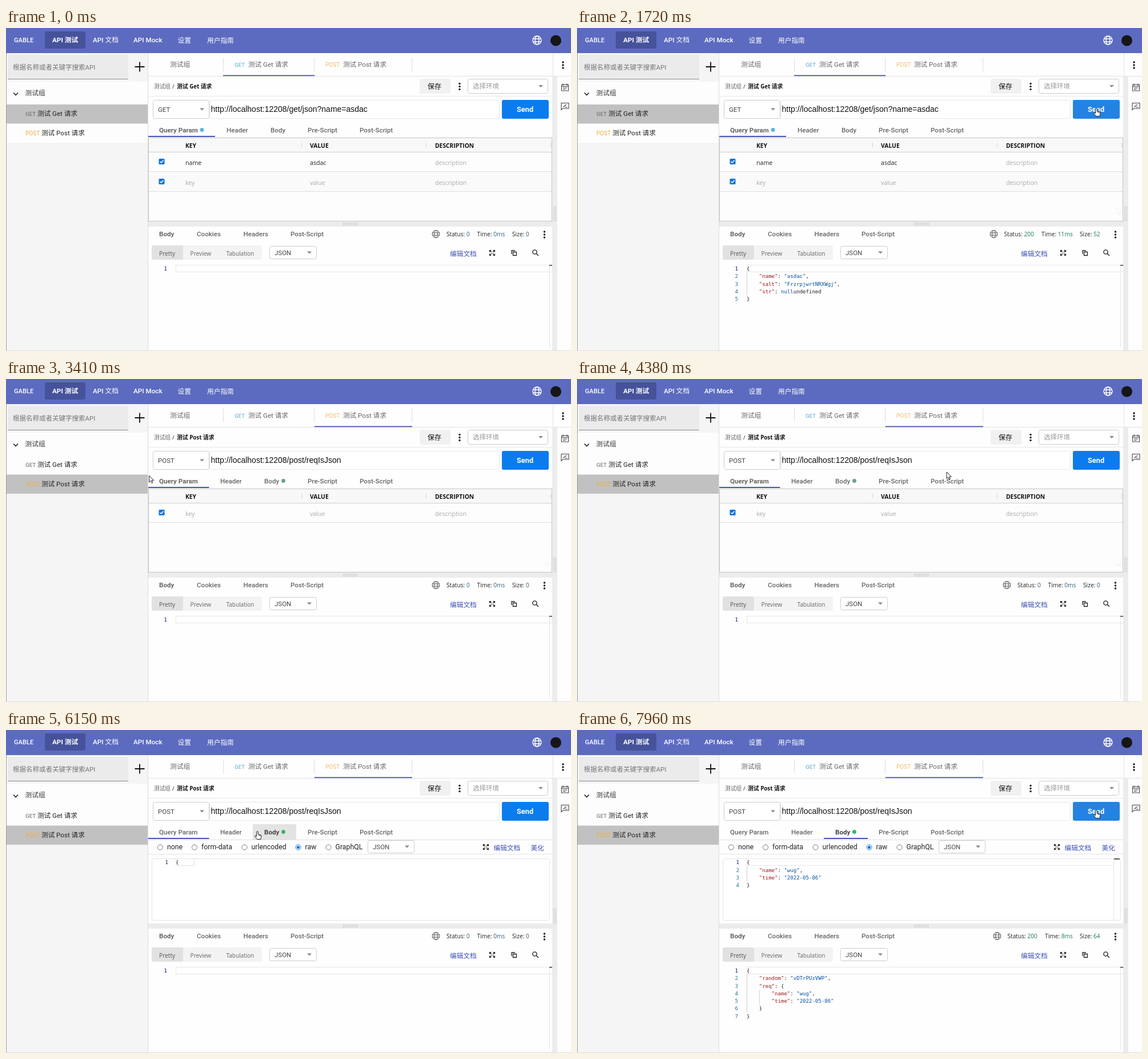
Animation of 989 by 566 pixels, one loop 8 s. Source, as an HTML page:

```html
<!DOCTYPE html>
<html lang="zh">
<head>
<meta charset="utf-8">
<title>API 测试</title>
<style>
html, body { margin: 0; width: 100%; height: 100%; overflow: hidden; background: #fff; }
svg { display: block; width: 989px; height: 566px; }
text { font: 400 11.6px Roboto, "Noto Sans CJK SC", "Noto Sans CJK", sans-serif; white-space: pre; }
text.ui { font-family: "Open Sans", "Noto Sans CJK SC", sans-serif; }
text.url { font: 14px "Liberation Sans", Arial, sans-serif; }
text.code { font: 9.05px "DejaVu Sans Mono", "Noto Sans Mono", monospace; }
</style>
</head>
<body>
<svg id="stage" viewBox="0 0 989 566"></svg>
<script>
const LOOP = 8000;
const BLUE = '#3f51b5', GREY = '#666', PALE = '#a9a9a9', INK = '#222';

// Drawing helpers
const rect = (x, y, w, h, fill, more = '') =>
  `<rect x="${x}" y="${y}" width="${w}" height="${h}" fill="${fill}" ${more}/>`;
const frame = (x, y, w, h, line = '#ccc', r = 3) =>
  rect(x + .5, y + .5, w - 1, h - 1, '#fff', `stroke="${line}" rx="${r}"`);
const circle = (x, y, r, fill, more = '') =>
  `<circle cx="${x}" cy="${y}" r="${r}" fill="${fill}" ${more}/>`;
const path = (d, x = 0, y = 0, color = INK, w = 1.2, fill = 'none') =>
  `<path d="${d}" transform="translate(${x} ${y})" fill="${fill}" stroke="${color}" stroke-width="${w}"/>`;
const text = (x, y, s, color = INK, size = 11.6, weight = 400, cls = '') =>
  `<text x="${x}" y="${y}" class="${cls}" fill="${color}" style="font-size:${size}px;font-weight:${weight}">${s}</text>`;
const ui = (x, y, s, color = INK, size = 10.6, weight = 400) => text(x, y, s, color, size, weight, 'ui');
const group = (id, body, more = '') => `<g id="${id}" ${more}>${body}</g>`;
const kebab = (x, y) => [-5, 0, 5].map(d => circle(x, y + d, 1.7, '#111')).join('');
const arrow = (x, y) => path('M-4 -2H4L0 2Z', x, y, 'none', 0, '#888');
const select = (x, y, w, h, s, color = '#444') =>
  frame(x, y, w, h) + text(x + 9, y + h / 2 + 4, s, color, 11.5) + arrow(x + w - 13, y + h / 2);
const globe = (x, y, r, color, w = 1.2) =>
  circle(x, y, r, 'none', `stroke="${color}" stroke-width="${w}"`) +
  `<ellipse cx="${x}" cy="${y}" rx="${r * .45}" ry="${r}" fill="none" stroke="${color}" stroke-width="${w}"/>` +
  path(`M${-r} ${-r * .33}H${r}M${-r} ${r * .33}H${r}`, x, y, color, w);
const expand = (x, y) =>
  path('M-4.5 -1.5V-4.5H-1.5M1.5 -4.5H4.5V-1.5M4.5 1.5V4.5H1.5M-1.5 4.5H-4.5V1.5M-4 -4L-1 -1M4 -4L1 -1M4 4L1 1M-4 4L-1 1', x, y);
const grip = (x, y, cols, rows) => {
  let s = '';
  for (let i = 0; i < cols * rows; i++)
    s += rect(x + (i % cols) * 3, y + Math.floor(i / cols) * 3, 1.4, 1.4, '#b5b5b5');
  return s;
};
const checkbox = (x, y) =>
  rect(x - 5, y - 5, 10, 10, '#0b74e0', 'rx="1.5"') + path('M-2.8 0L-.8 2.2L3 -2.2', x, y, '#fff', 1.5);

// Code lines with numbers, token colours and indent guides
const paint = s => s.replace(/"[^"]*"(:?)|null/g, (m, colon) =>
  `<tspan fill="${colon ? '#a31515' : '#0451a5'}">${colon ? m.slice(0, -1) : m}</tspan>${colon}`);
function code(y, end, lines) {
  return lines.map((s, i) => {
    const deep = s.search(/\S/), by = y + 13.25 * i;
    let out = text(end - (5.45), by, i + 1, i ? '#237893' : '#0b216f', 9.05, 400, 'code');
    for (let k = 0; k < deep; k += 4) out += rect(297 + k * 5.45, by - 10, 1, 13.3, '#d0d0d0');
    return out + text(297 + deep * 5.45, by, paint(s.trim()), INK, 9.05, 400, 'code');
  }).join('');
}
const currentLine = (y, right) =>
  rect(297.5, y + .5, right - 297, 12, '#fff', 'stroke="#e6e6e6"');

function tabs(names, xs, active, strong) {
  return names.map((s, i) =>
    text(xs[i], 182.5, s, i === active ? strong : GREY, 11.6, i === active ? 700 : 500)).join('');
}
const tabNames = ['Query Param', 'Header', 'Body', 'Pre-Script', 'Post-Script'];
const getXs = [268, 386, 463, 528, 619], postXs = [268, 375, 452, 528, 619];

const status = (id, xs, vals, color) => {
  const item = (i, label) => ui(xs[i + 1], 364.5, `${label}: <tspan fill="${color}">${vals[i]}</tspan>`, INK, 10.2);
  return group(id, globe(xs[0], 361, 6.4, '#555', 1) + item(0, 'Status') + item(1, 'Time') + item(2, 'Size'));
};
const row = (y, cells, color) => checkbox(272.5, y - 1) +
  [314, 532, 751].map((x, i) => ui(x, y + 4.5, cells[i], i < 2 ? color : PALE)).join('');
const crumb = name => ui(259, 106, '测试组', GREY, 9.7) + ui(291, 106, '/', INK, 9.7) + ui(299, 106, name, '#111', 9.8, 700);
const radio = (x, s, on) =>
  circle(x, 205.5, 4.5, '#fff', `stroke="${on ? '#0b74e0' : '#777'}"`) +
  (on ? circle(x, 205.5, 2.6, '#0b74e0') : '') + text(x + 12, 209, s, INK, 12.3);

const header =
  rect(0, 0, 989, 44, '#5c6bc0') + rect(68, 6, 71, 30, '#46529a', 'rx="3"') +
  text(14, 25, 'GABLE', '#fff', 11.1, 500) + text(81, 25, 'API 测试', '#fff', 11.7, 700) +
  text(152, 25, 'API 文档', '#fff', 11.7, 500) + text(223, 25, 'API Mock', '#fff', 11.7, 500) +
  text(300.5, 25.5, '设置', '#fff', 11.7) + text(352, 25.5, '用户指南', '#fff', 11.7) +
  globe(929.5, 21.5, 7.5, '#fff', 1.4) + circle(962.5, 22, 9.5, '#161616');

const sidebar =
  rect(0, 44, 248, 522, '#f5f5f5') + rect(3, 47, 211, 42, '#ebebeb') + rect(3, 89, 211, 1, '#8c8c8c') +
  text(12, 72.5, '根据名称或者关键字搜索API', '#757575', 11.5) +
  path('M-8.5 0H8.5M0 -8.5V8.5', 234, 68, '#111', 1.8) +
  rect(0, 94, 248, 107, '#fdfdfd') +
  path('M-4 -2L0 2L4 -2', 17, 115.5, INK, 1.6) + text(33.5, 118, '测试组', '#333', 11.7) +
  rect(0, 134, 248, 33.5, '#c1c1c1', 'id="pick"') +
  group('itemHover', rect(0, 167.5, 248, 33.5, '#e0e0e0') + kebab(231.5, 185)) +
  text(34, 154, 'GET', '#666', 9.8) + text(55, 154, '测试 Get 请求', INK, 11.6) +
  text(34, 187.5, 'POST', '#efae3d', 10) + text(62, 187.5, '测试 Post 请求', INK, 11.6) +
  rect(248, 44, 1, 522, '#dcdcdc') + rect(0, 44, 1, 522, '#9a9a9a');

const topTabs =
  text(287, 68, '测试组', GREY, 11.7) +
  text(400, 67.5, 'GET', '#5fa9cf', 9.8) + text(424, 68, '测试 Get 请求', GREY, 11.6) +
  text(559, 67.5, 'POST', '#f3bd6a', 10) + text(590, 68, '测试 Post 请求', GREY, 11.6) +
  [380, 539, 710].map(x => rect(x, 52, 1, 24, '#dedede')).join('') +
  rect(249, 84, 740, 1, '#e2e2e2') + rect(380, 82.5, 160, 1.7, '#4653a6', 'id="topLine"') +
  rect(957, 44, 1, 41, '#e2e2e2') + kebab(975, 65) +
  rect(956, 85, 9, 481, '#ececec') + grip(958.5, 313, 2, 9) +
  path('M-6 -4.5H6V6H-6ZM-6 -1.5H6M-3.5 -7V-3M3.5 -7V-3M-3.5 1H3.5M-3.5 3.5H1', 978.5, 104, '#444', 1.1) +
  path('M-6.5 6.5V-5.5H6.5V4H-4ZM-3 1.5L2.5 -3M0 1.8H4', 978.5, 137, '#444', 1.1);

const request =
  group('getCrumb', crumb('测试 Get 请求')) + group('postCrumb', crumb('测试 Post 请求')) +
  rect(724, 89, 54, 26, '#f1f1f1', 'rx="3"') + text(738, 106.5, '保存', '#111', 12, 500) + kebab(794, 102.5) +
  select(808, 89, 141, 26, '选择环境', '#999') + rect(249, 119, 707, 1, '#e8e8e8') +
  frame(356, 126, 508, 33, '#e8e8e8') +
  group('getUrl', select(257, 126, 99, 33, 'GET') + text(358.5, 146.5, 'http://localhost:12208/get/json?name=asdac', '#111', 14, 400, 'url')) +
  group('postUrl', select(257, 126, 99, 33, 'POST') + text(358.5, 146.5, 'http://localhost:12208/post/reqIsJson', '#111', 14, 400, 'url')) +
  rect(868, 126, 82, 33, '#0a7cee', 'rx="3" id="send"') + text(894, 147, 'Send', '#fff', 12.8, 700) +
  rect(432, 165, 76, 27, '#e3e3e3', 'id="tabHover"') +
  group('getTabs', tabs(tabNames, getXs, 0, GREY) + circle(343, 178.5, 3.4, '#5cb3e4')) +
  group('postTabs', tabs(tabNames, postXs, 0, GREY) + circle(485.5, 178.5, 3.4, '#6f9f88')) +
  group('bodyTabs', tabs(tabNames, postXs, 2, '#444') + circle(485.5, 178.5, 3.4, '#45ad68'));

const table = group('table',
  rect(249.5, 192.5, 706, 146, '#fdfdfd', 'stroke="#c4c4c4"') + rect(250, 193, 705, 24, '#f8f8f8') +
  rect(250, 217, 705, 1, '#cfcfcf') +
  ui(314, 209.5, 'KEY', '#111', 10.3, 700) + ui(532, 209.5, 'VALUE', '#111', 10.3, 700) + ui(751, 209.5, 'DESCRIPTION', '#111', 10.3, 700) +
  [517, 735, 953].map(x => rect(x, 201, 1, 8, '#d4d4d4')).join('') +
  group('menu', path('M-4.5 -3H4.5M-4.5 0H4.5M-4.5 3H4.5', 714.5, 204.5, '#999', 1)) +
  rect(250, 252, 705, 34, '#fafafa', 'id="secondBack"') +
  rect(250, 218, 704, 33, '#e7f4fe', 'id="rowHover"') + rect(250, 251, 705, 1, '#dedede') +
  group('getRows', row(235, ['name', 'asdac', 'description'], INK) +
    row(270, ['key', 'value', 'description'], PALE) + rect(250, 286, 705, 1, '#dedede')) +
  group('postRows', row(235, ['key', 'value', 'description'], PALE)) +
  path('M0 0V11L3 8.5L5 13L7 12L5 8H9Z', 944.5, 315, '#f1f1f1', 1, '#fff').replace('<path', '<path id="ghost"'));

const bodyPanel = group('bodyPanel',
  rect(249, 192, 707, 1, '#dedede') + radio(270, 'none') + radio(330, 'form-data') + radio(417.5, 'urlencoded') +
  radio(511.5, 'raw', true) + radio(564.5, 'GraphQL') + select(633, 193, 82, 23, 'JSON') +
  expand(840, 205) + text(853.5, 211, '编辑文档', BLUE, 11.7) + text(918.5, 211, '美化', BLUE, 11.7) +
  rect(249, 217, 707, 1, '#e4e4e4') + frame(255, 225, 697, 109, '#e4e4e4') +
  group('loading', rect(297.5, 225.5, 32, 12, '#fff', 'stroke="#e2e2e2"') + code(235.3, 284, ['{'])) +
  group('loaded', currentLine(225, 939) + rect(939, 226, 1, 107, '#e2e2e2') + rect(940, 225, 10, 2, '#555') +
    code(235.3, 284, ['{', '    "name": "wug",', '    "time": "2022-05-86"', '}'])));

const response =
  rect(249, 339, 707, 9, '#ececec') + grip(590, 341.5, 9, 2) +
  text(268, 365, 'Body', GREY, 11.6, 700) + text(334, 365, 'Cookies', GREY, 11.6, 500) +
  text(415.5, 365, 'Headers', GREY, 11.6, 500) + text(498, 365, 'Post-Script', GREY, 11.6, 500) +
  status('idle', [752.5, 771, 824.5, 886], ['0', '0ms', '0'], '#2c5f7c') +
  status('getStat', [729.5, 747.5, 813, 880], ['200', '11ms', '52'], '#1b7a50') +
  status('postStat', [735.5, 753.5, 819, 880], ['200', '8ms', '64'], '#1b7a50') + kebab(942.5, 362) +
  rect(255, 381, 193, 25, '#f3f3f3', 'rx="3"') + rect(255, 381, 55, 25, '#e1e1e1', 'rx="3"') +
  ui(268, 399, 'Pretty', '#555', 10.2) + ui(322.5, 399, 'Preview', '#666', 10.2) + ui(385.5, 399, 'Tabulation', '#666', 10) +
  select(461, 382, 83, 23, 'JSON') + text(777, 399.5, '编辑文档', BLUE, 11.7) + expand(851, 394) +
  path('M-1.5 -1.5H4.5V4.5H-1.5ZM-4 2V-4H2', 889, 394, INK, 1.3) +
  circle(925.5, 392.5, 3.6, 'none', 'stroke="#222" stroke-width="1.4"') + path('M2.5 2.5L6.5 6.5', 925.5, 392.5, INK, 1.5) +
  currentLine(415, 956) + rect(951, 416, 1, 144, '#e4e4e4') + rect(951, 415, 5, 1.6, '#444') +
  group('emptyCode', code(425.2, 282, ['{']).replace('>{<', '><')) +
  group('getCode', code(425.2, 282, ['{', '    "name": "asdac",', '    "salt": "FrzrpjwrtNRXWgj",', '    "str": null', '}'])) +
  group('postCode', code(425.2, 282, ['{', '    "random": "vDTrPUzVWP",', '    "req": {',
    '        "name": "wug",', '        "time": "2022-05-86"', '    }', '}']));

const cursors = group('cursor',
  group('point', path('M0 0V11.5L2.7 9L4.6 13L6.4 12.2L4.6 8.3H8.2Z', 0, 0, '#222', 1, '#fff')) +
  group('hand', path('M-1.3 10V1.2Q0 -.6 1.3 1.2V6L6 7Q7.2 7.5 7 9L6 14.5H-.5L-4.3 9.5Q-4.6 7.6 -2.8 8.2ZM3 6.5V8.5M5 7V8.8', 0, 0, '#222', 1, '#fff')) +
  group('beam', path('M-2.5 -5.5H-.7L0 -5L.7 -5.5H2.5M0 -5V5M-2.5 5.5H-.7L0 5L.7 5.5H2.5', 0, 0, '#333', 1)) +
  group('resize', path('M-1 -5V5M1.5 -5V5M-2 0H-6M-4 -2L-6 0L-4 2M2.5 0H7M5 -2L7 0L5 2', 0, 0, '#222', 1)));

const stage = document.getElementById('stage');
stage.innerHTML = rect(0, 0, 989, 566, '#fefefe') + header + sidebar + topTabs + request + table + bodyPanel +
  rect(249, 189, 117, 2, BLUE, 'id="tabLine"') + response + rect(0, 565, 989, 1, '#dcdcdc') + cursors;

const parts = {};
stage.querySelectorAll('[id]').forEach(e => parts[e.id] = e);
const show = flags => {
  for (const id in flags) parts[id].style.display = flags[id] ? '' : 'none';
};
const set = (id, attrs) => {
  for (const k in attrs) parts[id].setAttribute(k, attrs[k]);
};

// Pointer path: time, x, y
const trail = [
  [210, 940, 522], [330, 914, 324], [580, 914, 324], [640, 944, 315], [710, 958, 190], [800, 958, 190],
  [1090, 909, 140], [1970, 909, 140], [2730, 158, 180], [2900, 158, 180], [2910, 153, 173],
  [3180, 153, 173], [3810, 419, 163], [4060, 419, 163], [4170, 573, 163], [4330, 573, 163],
  [4380, 647, 163], [4450, 647, 163], [4840, 909, 140], [5130, 909, 140], [5230, 499.5, 233.5],
  [5340, 499.5, 233.5], [5590, 455, 178], [5880, 455, 178], [6000, 440, 177], [6190, 440, 177],
  [6670, 682, 207], [6780, 682, 207], [6820, 688, 207], [7070, 688, 207], [7420, 909, 140], [LOOP, 909, 140]
];
function pointer(t) {
  const i = Math.max(1, trail.findIndex(k => k[0] > t));
  const [t0, x0, y0] = trail[i - 1], [t1, x1, y1] = trail[i];
  const p = Math.max(0, (t - t0) / (t1 - t0));
  return [x0 + (x1 - x0) * p, y0 + (y1 - y0) * p];
}
const inside = (x, y, l, t, r, b) => x >= l && x < r && y >= t && y < b;

function draw(t) {
  const [x, y] = pointer(t);
  const post = t >= 3220, body = t >= 6150, got = t >= 1400 && !post, done = t >= 7800;
  const seen = t >= 210;
  const onSend = seen && inside(x, y, 868, 126, 950, 159);
  const onItem = seen && inside(x, y, 0, 94, 248, 201);
  const onTab = inside(x, y, 249, 165, 690, 192) && x > 432 && x < 508;
  const onRow = seen && !body && inside(x, y, 250, 218, 954, post ? 251 : 286);
  const onSelect = body && inside(x, y, 633, 193, 715, 216);
  const onEdge = seen && t < 1000 && inside(x, y, 956, 85, 965, 300);
  const hand = onSend || onItem || onTab || onSelect;
  const beam = !hand && (onRow || inside(x, y, 359, 126, 863, 159));

  show({
    getCrumb: !post, postCrumb: post, getUrl: !post, postUrl: post,
    getTabs: !post, postTabs: post && !body, bodyTabs: body,
    table: !body, getRows: !post, postRows: post, secondBack: !post, rowHover: onRow,
    ghost: t >= 640, menu: t >= 5180 && t < 5400,
    bodyPanel: body, loading: t < 6190, loaded: t >= 6190,
    idle: !got && !done, getStat: got, postStat: done,
    emptyCode: !got && !done, getCode: got, postCode: done,
    itemHover: onItem && y > 167 && !post,
    cursor: seen, hand, beam, resize: onEdge, point: !hand && !beam && !onEdge
  });

  const slide = Math.min(1, Math.max(0, (t - 6190) / 300)), ease = slide * slide * (3 - 2 * slide);
  set('tabLine', { x: 249 + 183 * ease, width: post ? 106.5 - 29.5 * ease : 117 });
  set('tabHover', { opacity: body ? 1 - ease : onTab && t > 5340 ? .4 : 0 });
  set('topLine', { x: post ? 540 : 380, width: post ? 171 : 160 });
  set('pick', { y: post ? 167.5 : 134 });
  set('rowHover', { y: y < 252 ? 218 : 252 });
  set('send', { fill: onSend ? '#2383e2' : '#0a7cee' });
  set('cursor', { transform: `translate(${x} ${y})` });
}

const start = performance.now();
function tick() {
  draw((performance.now() - start) % LOOP);
  requestAnimationFrame(tick);
}
tick();
</script>
</body>
</html>
```
